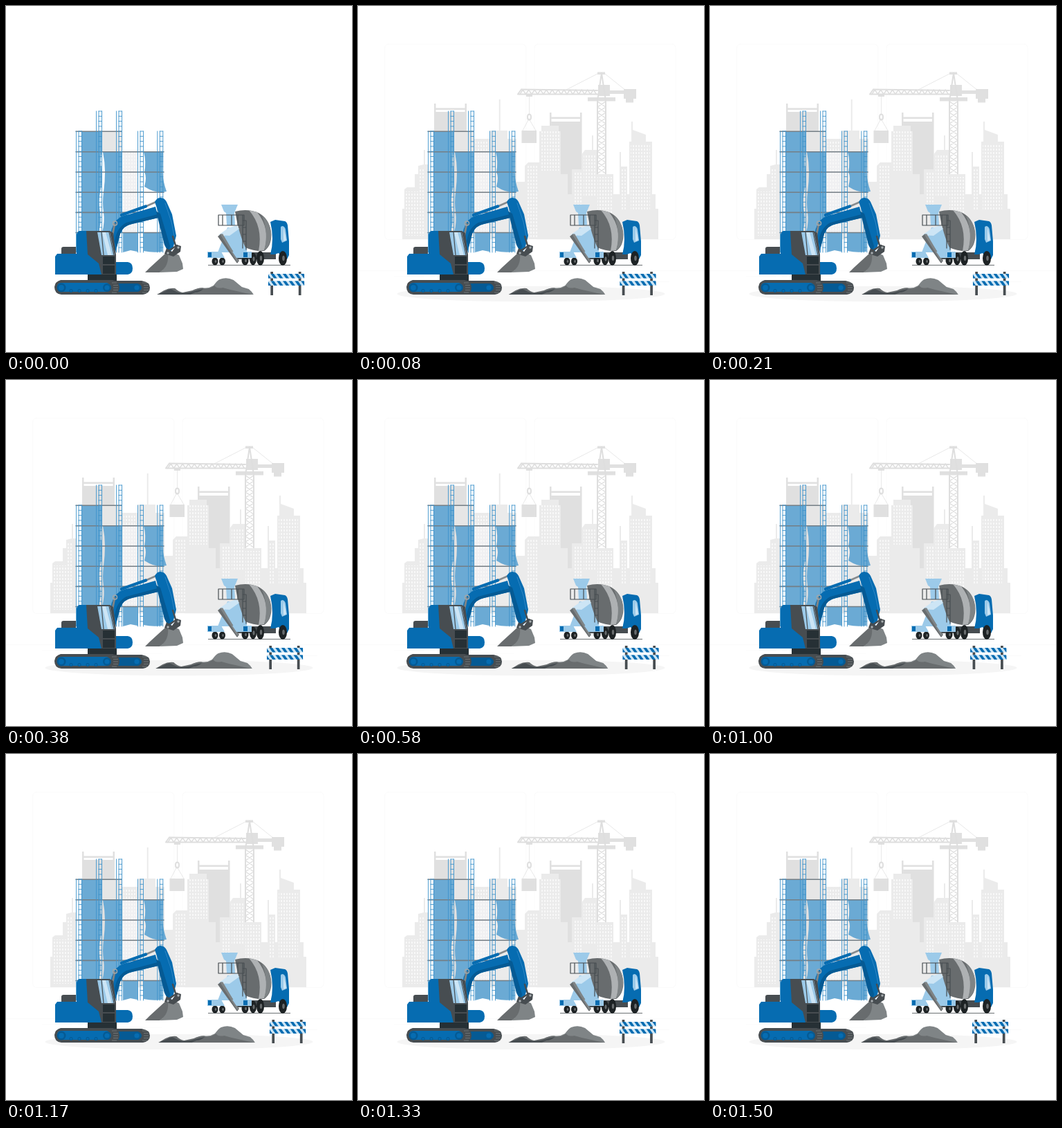
Recreate the animation shown at these times as an HTML page. Size 500 px wide and 500 px high, loop 1.54 s.

```html
<!DOCTYPE html>
<html lang="en">
<head>
<meta charset="utf-8">
<title>Construction site</title>
<style>
  html, body { margin: 0; width: 100%; height: 100%; overflow: hidden; background: #fff; }
  svg { display: block; width: 100%; height: 100%; }
  .line { fill: none; stroke-linecap: round; stroke-linejoin: round; }
  .blue { fill: #066cb1; } .deep { fill: #055a94; } .sky { fill: #9ccae9; } .pale { fill: #cde5f5; }
  .dark { fill: #474d51; } .ink { fill: #263035; } .grey { fill: #686c6e; } .mid { fill: #7f8486; }
</style>
</head>
<body>
<svg viewBox="0 0 500 500">
  <defs>
    <pattern id="panes" width="4" height="5" patternUnits="userSpaceOnUse">
      <rect x="1" y="1" width="2" height="3" fill="#f7f7f7"/>
    </pattern>
    <clipPath id="boards"><path d="M379 387h52.300v6.600h-52.300zM379 397.300h52.300v6.700h-52.300z"/></clipPath>
  </defs>

  <g id="backdrop">
    <g fill="none" stroke="#ebebeb" stroke-width=".25">
      <rect x="38.800" y="55" width="204" height="282.500" rx="5.500"/>
      <rect x="255" y="55" width="204" height="282.500" rx="5.500"/>
      <path d="M0 382.500H500M417 398.500h33M322 401.300h9M397 389.300h19M52 391h43M104 391h7M131 395.200h94"/>
    </g>
    <ellipse cx="250" cy="416" rx="193.500" ry="11.300" fill="#f5f5f5"/>
    <g fill="#e0e0e0">
      <path d="M110 141h2.500v6.500h42V141h2.500v196h-47zM112.500 150v3h42v-3z" fill-rule="evenodd"/>
      <path d="M277 154h2.500v6.500h41.500V154h2.500v89H309v29h-6v-29H277zM279.500 163v4h41.500v-4z" fill-rule="evenodd"/>
      <path d="M346 95.500h11v3.500h-11zM347 114h17v16h-17zM332 132h40v5.500h-40zM358 122h44v5h-44zM384 120h18v14h-4v5.500h-11v-5.500h-3zM236.500 180h21.500v18h-21.500zM243 127h9v4h-9z"/>
    </g>
    <g class="line" stroke="#dedede">
      <path d="M231 127.500H346M236 120.500L346 122M231 127.500L236 120.500M352 97L346 137V243M352 97L358 137V243" stroke-width="2"/>
      <path id="truss" stroke-width="1.500"/>
      <path d="M346 98L301 121M357 98L387 122M247.500 129V157M247 163L238 180M247 163L257 180" stroke-width=".7"/>
      <ellipse cx="247.500" cy="160.500" rx="2.500" ry="4" stroke-width="2"/>
    </g>
    <path fill="#ebebeb" d="M64 337V293H67V265L71 262H82V243H87V231L95 229V208H97V229H101V337zM157 337V192H190V180H203.700V135H205.700V180H216V192H229V337zM229 337V254H241V231L246 226H262V181H265V173H290V181H293V243H303V272H309V236H323V215L328 208H338V187H340V208H345V243H369V272H378V211H380V232H389V272H392V196H395V167H397V179L416 186V196H425V272H430V293H434V337z"/>
    <path fill="url(#panes)" d="M69 268h26v64H69zM87 234h10v34H87zM170 196h18v138h-18zM243 230h18v104h-18zM265 180h26v58h-26zM326 214h18v62h-18zM346 247h22v56h-22zM379 236h9v60h-9zM394 200h28v96h-28zM311 240h14v48h-14z"/>
  </g>

  <g id="scaffold">
    <path fill="#e6e6e6" d="M139 182h28v28h-28z"/>
    <path fill="#f0f0f2" d="M169 211h21v115h-21z"/>
    <path fill="url(#panes)" d="M169 211h21v115h-21z"/>
    <path fill="#6baad4" d="M109 182h30v28q-4 12-1 25t-2 34q-3 14 0 29t-3 29h-24zM140 211h28v116h-29q4-15 2-29t0-29 2-29-3-29zM199 211h28l-1 29q1 14 6 28-15 4-32-7 4-14 0-21 3-15-1-29zM169 328h21v27l-10-2-11 3zM199 328h27v27q-14 2-27-1zM110 300h25v27h-25z"/>
    <path id="planks" class="line" stroke="#747e85" stroke-width="1.600"/>
    <path id="ladders" class="line" stroke="#3f93cb" stroke-width=".9"/>
  </g>

  <g id="truck">
    <path d="M292 374.500H411" stroke="#474d51" stroke-width=".8"/>
    <path class="dark" d="M330 356h60v10h-60z"/>
    <path class="sky" d="M320 320h16l8 10 4 10v16h-42z"/>
    <path class="grey" d="M331 297q18-5 34 2 15 8 18 27 2 20-10 28-14 1-27-5-9-18-15-52z"/>
    <path fill="#aeb1b3" d="M351 295q21 24 14 59l8-1q10-30-10-55z"/>
    <path class="mid" d="M370 303q11 9 13 24 1 18-10 26 7-25-3-50z"/>
    <path class="blue" d="M382 312l7-3 14 2q3 1 4 6l2 23v20l-3 6h-6l-6-9-6 2h-6q6-22 0-47z"/>
    <path class="sky" d="M397 320q0-2 3-2 3 1 4 5l2 16-7 3-2-5z"/>
    <path class="pale" d="M401 320l4 18-4 2z"/>
    <path class="sky" d="M311 287h24l-5 12 1 18h-12l-1-18-3-2z"/>
    <path class="pale" d="M307 331l14-10 12-4 4 5-14 10z"/>
    <path class="grey" d="M306 333l5-4 26 39-3 4z"/>
    <path class="mid" d="M310 331l3-2 23 39-2 2z"/>
    <path class="line" stroke="#474d51" stroke-width="1.200" d="M307 302h37v15h-37zM313 302v15M326 302v15M335 302v15M342 302v48M347 310v42M342 310h5M342 320h5M342 330h5M342 340h5"/>
    <g id="wheels"></g>
    <path class="sky" d="M291 355h20l5 9h-25zM327 355h28v9h-22z"/>
    <path class="blue" d="M292 356h5v7h-5zM343 356h6v7h-6z"/>
  </g>

  <g id="excavator">
    <path class="dark" d="M134 397h62q12 2 12 10t-10 10h-64z"/>
    <path class="deep" d="M150 401h40q6 2 6 6t-6 6h-40z"/>
    <path class="ink" d="M118 387h42v10h-42z"/>
    <path class="dark" d="M80 351q0-3 3-3h18v12H80zM79 396h75q10 2 10 11t-11 10H80q-10-1-10-11 1-8 9-10z"/>
    <path class="blue" d="M80 400h66q5 2 5 7t-5 6H81q-7-1-7-7t6-6z"/>
    <g id="rollers"></g>
    <path id="treads" stroke="#7f8486" stroke-width=".7"/>
    <path class="blue" d="M74 358h28v-28q1-4 4-5h14v35l18 10h38q7 1 7 9t-7 9H71v-26z"/>
    <path class="blue" d="M147 352l4-22q3-18 13-24 6-4 14-5l38-11 4 16-38 9q-12 2-17 14l-8 31z"/>
    <path class="deep" d="M157 340q3-20 17-27l45-12 1 5-38 9q-12 2-17 14l-5 20z"/>
    <g class="line">
      <path d="M157 315L153 335" stroke="#7f8486" stroke-width="3"/>
      <circle cx="157.500" cy="314" r="3" stroke="#a0a6a9" stroke-width="1.500"/>
      <path d="M200 290.500L217 283" stroke="#868b8e" stroke-width="2.500"/>
      <path d="M167 302L202 289.500" stroke="#066cb1" stroke-width="4.500"/>
    </g>
    <path class="dark" d="M116 325h34l5 3 4 32v28h-21l-4-16-16-13z"/>
    <path class="sky" d="M132 327h18l7 33h-19z"/>
    <path class="pale" d="M139 327h5l9 33h-6z"/>
    <path class="ink" d="M140 362h17v11h-17zM140 375h17v12h-17z"/>
    <path d="M138 327l3 33M149 327l7 33" stroke="#474d51" stroke-width="1.200"/>
    <path class="blue" d="M215 283q3-6 8-6 6 0 9 6l8 18 6 31-5 19-6 6-6-12-9-47z"/>
    <path class="deep" d="M217 297l6 3 14 47-2 8-6-10z"/>
    <path class="line" d="M230 285l9 27 4 20" stroke="#2d86c4" stroke-width="1"/>
    <path class="line" d="M233 355l14-9M241 333l5 16" stroke="#474d51" stroke-width="2.500"/>
    <path class="mid" d="M222 385q10-6 11-27l7-2 10 4 5 12 1 8-9 4z"/>
    <path class="grey" d="M201 385l7-7 23-21 3 1q2 18-12 27z"/>
    <path class="dark" d="M229 358l3-8 8 5 7-10 6 2-1 8-10 7z"/>
    <g fill="#a7adb0"><circle cx="234" cy="357" r="1.700"/><circle cx="249" cy="349" r="1.700"/></g>
  </g>

  <g id="shaking">
    <path class="mid" d="M264 417q8-9 20-10 8 2 16-3 6-8 9-9 10-4 20 1l12 10 10 3q5 4 7 8z"/>
    <path class="grey" d="M218.500 417l10-6q8-4 16-3 5 5 11 6l14-3q10-5 16-3 8 2 16-4 3 5 12 3 10 3 20 5 12 3 24 5z"/>
    <path class="dark" d="M218.500 417l12-5q6-4 10-2 7 4 13 5l11-1q14-4 21-5-6 5-12 5-5 2-7 3z"/>
    <path class="dark" d="M382.500 384h3.700v34h-3.700zM423 384h3.700v34H423z"/>
    <g clip-path="url(#boards)">
      <path class="pale" d="M379 387h53v18h-53z"/>
      <path id="stripes" class="blue"/>
    </g>
  </g>
</svg>
<script>
  const $ = id => document.getElementById(id);
  const repeat = (count, make) => Array.from({ length: count }, (_, i) => make(i)).join('');
  const setPath = (id, d) => $(id).setAttribute('d', d);

  setPath('truss',
    repeat(13, i => `M${234 + i * 8.5} 127.500l4.200 -6.500l4.200 6.500`) +
    repeat(13, i => `M346 ${138 + i * 8}l12 8M358 ${138 + i * 8}l-12 8`));

  const levels = [181.3, 210.7, 240, 269.2, 298.4, 327.5];
  setPath('planks', levels.map((y, i) => `M101 ${y}H${i ? 228 : 167}`).join(''));
  setPath('ladders', [[101.5, 181], [130.5, 152], [159.5, 152], [190.5, 181], [218.8, 181]].map(([x, top]) =>
    `M${x} ${top}V356M${x + 3.5} ${top}V356M${x + 8} ${top}V356` +
    repeat(Math.floor((356 - top) / 7.3) + 1, i => `M${x + 3.5} ${top + i * 7.3}h4.500`)).join(''));

  const wheel = ([x, y, rx, ry]) =>
    `<ellipse fill="#1d2224" cx="${x}" cy="${y}" rx="${rx}" ry="${ry}"/>
     <ellipse class="grey" cx="${x + 1}" cy="${y}" rx="${rx * 0.3}" ry="${ry * 0.35}"/>`;
  $('wheels').innerHTML = [[302, 369, 4.5, 5.5], [312.5, 369, 4.5, 5.5], [345.5, 368, 5, 6.5],
    [357, 365.5, 5, 9], [367.5, 364.5, 5.5, 10.5], [400, 364.5, 6, 10.5]].map(wheel).join('');

  const roller = (x, y, r) =>
    `<circle class="deep" cx="${x}" cy="${y}" r="${r}"/><circle class="blue" cx="${x}" cy="${y}" r="${r * 0.6}"/>`;
  $('rollers').innerHTML = roller(80, 407, 6.5) + roller(146, 407, 6) + roller(189, 407, 6) +
    repeat(4, i => roller(94 + i * 12, 411.5, 2.5));
  setPath('treads', [153, 197].map(x => repeat(5, i => `M${x + (i % 4 ? 2 : 0)} ${400 + i * 3.5}h7`)).join(''));

  const stripes = (y, lean) => repeat(8, i => `M${374 + i * 8.7} ${y}h4.500l${lean} 7h-4.500z`);
  setPath('stripes', stripes(387, 5) + stripes(397.2, 5).replace(/^/, ''));

  const LOOP = 1540, SHAKE = 1500, LEAD = 30, FPS = 24;
  const offsets = [0, -1, 2, -4, 4, -4, 4, -4, 2, -1, 0];

  function shakeAt(ms) {
    const pos = (ms % SHAKE) / SHAKE * 10, i = Math.floor(pos);
    return offsets[i] + (offsets[i + 1] - offsets[i]) * (pos - i);
  }

  function draw(now) {
    const t = now % LOOP;
    const step = t < 80 ? 0 : Math.floor((t + 5) * FPS / 1000);
    $('backdrop').style.visibility = step ? 'visible' : 'hidden';
    $('shaking').setAttribute('transform', `translate(${shakeAt(step * 1000 / FPS + LEAD)} 0)`);
    requestAnimationFrame(draw);
  }
  draw(performance.now());
</script>
</body>
</html>
```
